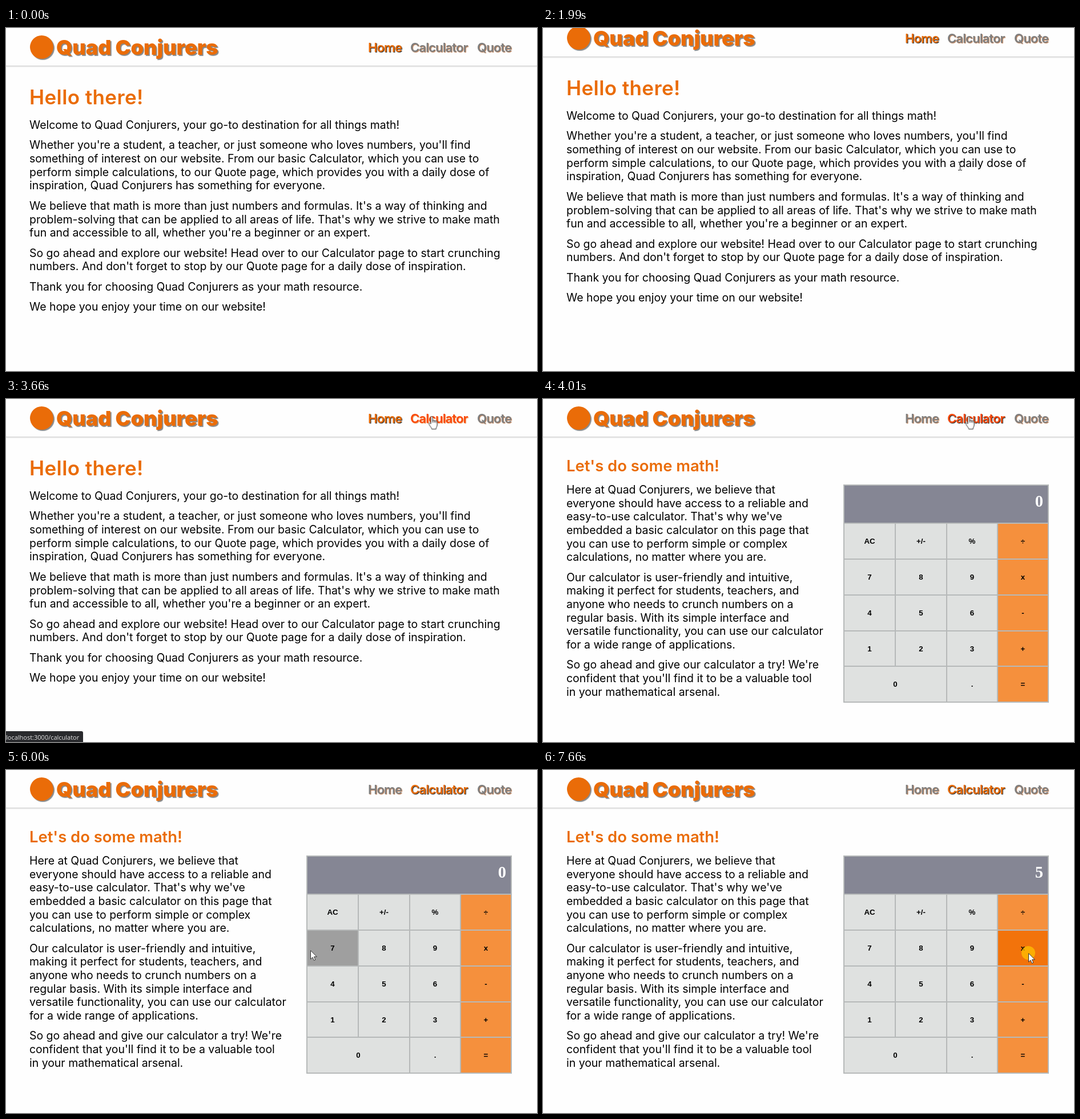
These frames come from a looping animation (930 px wide and 602 px high, 8 s). An HTML page:

```html
<!DOCTYPE html>
<html lang="en">
<head>
<meta charset="utf-8">
<title>Quad Conjurers</title>
<style>
  :root { --orange: #ea6c08; --hot: #fb4a0c; --grey: #808080; --rust: #b8794f; --loop: 8s step-end infinite; }
  html, body { margin: 0; width: 100%; height: 100%; overflow: hidden; background: #fefefe; }
  .stage { position: relative; width: 930px; height: 602px; overflow: hidden; font-family: Inter, "Open Sans", sans-serif; font-optical-sizing: none; font-variation-settings: "opsz" 14; }
  .stage * { box-sizing: border-box; }
  .abs, .layer, nav span, h1, h2, .text, svg { position: absolute; }
  .layer { inset: 0; }
  h1, h2, p { margin: 0; white-space: nowrap; }

  .scroll { animation: scroll var(--loop); }
  header { position: absolute; left: 0; top: 0; width: 930px; height: 67px; border-bottom: 1px solid #d2d2d2; box-shadow: 0 1px 2px #ddd; }
  .logo { left: 42px; top: 13px; width: 41px; height: 41px; border-radius: 50%; background: var(--orange); box-shadow: 2px 2px 1px #8a8a8a; }
  h1 { left: 88px; top: 12px; font-size: 36px; line-height: 44px; font-weight: 900; color: var(--orange); text-shadow: 2px 2px 1px #888; }
  h2 { left: 41px; font-weight: 600; line-height: 44px; color: var(--orange); }
  nav span { top: 20px; line-height: 28px; font-size: 22px; font-weight: 600; letter-spacing: -.85px; color: var(--grey); text-shadow: 1px 1px 1px var(--rust); }
  .text { left: 41px; font-size: 19.45px; line-height: 23.65px; font-weight: 400; color: #000; }
  .text p + p { margin-top: 11.8px; }

  .home { animation: home var(--loop); }
  .calc { visibility: hidden; animation: calc var(--loop); }
  .to-home { animation: to-home var(--loop); }
  .to-calc { animation: to-calc var(--loop); }
  .status { left: -1px; top: 583px; width: 136px; height: 20px; padding-left: 1px; border-radius: 0 3px 0 0; background: #292a2d; color: #e6e6e6; font: 11px/21px "Open Sans", sans-serif; white-space: nowrap; visibility: hidden; animation: status var(--loop); }

  .pad { left: 526px; top: 150px; width: 360px; height: 383px; padding: 2px; display: grid; gap: 2px; grid-template: 65px 61px 61px 61px 60px 61px / 88px 88px 87px 87px; background: #b6b9b9; font: bold 13.3px "Liberation Sans", Arial, sans-serif; }
  .pad div { display: grid; place-items: center; background: #dfe1e0; }
  .pad .op { background: #f5903d; }
  .pad .wide { grid-column: span 2; }
  .pad .screen { grid-column: span 4; position: relative; background: #858694; color: #fff; font: bold 28.5px/56px "Liberation Serif", serif; }
  .screen span { position: absolute; right: 8px; top: 0; }
  .zero { animation: zero var(--loop); }
  .five { animation: five var(--loop); }
  .pad .k7 { animation: k7 var(--loop); }
  .pad .k5 { animation: k5 var(--loop); }
  .pad .kx { animation: kx var(--loop); }

  svg { left: 0; top: 0; overflow: visible; visibility: hidden; }
  .arrow { animation: arrow var(--loop); }
  .beam { animation: beam var(--loop); }
  .hand { animation: hand var(--loop); }
  .click { left: -12px; top: -12px; width: 24px; height: 24px; border-radius: 50%; background: #ffc400b8; visibility: hidden; animation: click var(--loop); }

  @keyframes scroll { 24.875% { transform: translateY(-16px) } 29%, 100% { transform: none } }
  @keyframes home { 0% { visibility: visible } 50.125%, 100% { visibility: hidden } }
  @keyframes calc { 0% { visibility: hidden } 50.125%, 100% { visibility: visible } }
  @keyframes status { 0% { visibility: hidden } 41.75% { visibility: visible } 50.125%, 100% { visibility: hidden } }
  @keyframes to-home {
    0% { color: var(--orange); text-shadow: 1px 1px 1px #222 }
    50.125%, 100% { color: var(--grey); text-shadow: 1px 1px 1px var(--rust) }
  }
  @keyframes to-calc {
    0% { color: var(--grey); text-shadow: 1px 1px 1px var(--rust) }
    37.375% { color: var(--hot); text-shadow: 1px 1px 1px #e98a4a }
    50.125% { color: var(--hot); text-shadow: 1px 1px 1px #222 }
    62.625%, 100% { color: var(--orange); text-shadow: 1px 1px 1px #222 }
  }
  @keyframes zero { 0% { opacity: 1 } 87.5%, 100% { opacity: 0 } }
  @keyframes five { 0% { opacity: 0 } 87.5%, 100% { opacity: 1 } }
  @keyframes k7 { 75% { background: #9f9f9f } 79.25%, 100% { background: #dfe1e0 } }
  @keyframes k5 { 79.25% { background: #9f9f9f } 91.625%, 100% { background: #dfe1e0 } }
  @keyframes kx { 0% { background: #f5903d } 91.625%, 100% { background: #f2730b } }
  @keyframes arrow {
    0% { visibility: hidden }
    12.375% { visibility: visible; transform: translate(743px, 216px) }
    16.5% { visibility: hidden }
    62.625% { visibility: visible; transform: translate(599px, 71px) }
    66.75% { visibility: visible; transform: translate(468px, 266px) }
    70.875% { visibility: visible; transform: translate(467px, 314px) }
    75% { visibility: visible; transform: translate(533px, 316px) }
    79.25% { visibility: visible; transform: translate(668px, 378px) }
    91.625%, 100% { visibility: visible; transform: translate(850px, 321px) }
  }
  @keyframes beam { 0% { visibility: hidden } 16.5% { visibility: visible } 37.375%, 100% { visibility: hidden } }
  @keyframes hand {
    0% { visibility: hidden }
    37.375% { visibility: visible; transform: translate(738px, 30px) }
    41.75% { visibility: visible; transform: translate(736px, 29px) }
    45.75% { visibility: visible; transform: translate(739.5px, 29.5px) }
    62.625%, 100% { visibility: hidden }
  }
  @keyframes click {
    0% { visibility: hidden }
    83.25% { visibility: visible; transform: translate(668px, 378px) }
    87.5% { visibility: hidden }
    95.75%, 100% { visibility: visible; transform: translate(850px, 321px) }
  }
</style>
</head>
<body>
<div class="stage">
  <div class="layer scroll">
    <header>
      <div class="abs logo"></div>
      <h1>Quad Conjurers</h1>
      <nav>
        <span class="to-home" style="left:634px">Home</span>
        <span class="to-calc" style="left:708px">Calculator</span>
        <span style="left:825px">Quote</span>
      </nav>
    </header>

    <main class="layer home">
      <h2 style="top:99px;font-size:35px;letter-spacing:.4px">Hello there!</h2>
      <div class="text" style="top:159px">
        <p>Welcome to Quad Conjurers, your go-to destination for all things math!</p>
        <p>Whether you're a student, a teacher, or just someone who loves numbers, you'll find<br>something of interest on our website. From our basic Calculator, which you can use to<br>perform simple calculations, to our Quote page, which provides you with a daily dose of<br>inspiration, Quad Conjurers has something for everyone.</p>
        <p>We believe that math is more than just numbers and formulas. It's a way of thinking and<br>problem-solving that can be applied to all areas of life. That's why we strive to make math<br>fun and accessible to all, whether you're a beginner or an expert.</p>
        <p>So go ahead and explore our website! Head over to our Calculator page to start crunching<br>numbers. And don't forget to stop by our Quote page for a daily dose of inspiration.</p>
        <p>Thank you for choosing Quad Conjurers as your math resource.</p>
        <p>We hope you enjoy your time on our website!</p>
      </div>
    </main>

    <main class="layer calc">
      <h2 style="top:95px;font-size:27.4px">Let's do some math!</h2>
      <div class="text" style="top:148px">
        <p>Here at Quad Conjurers, we believe that<br>everyone should have access to a reliable and<br>easy-to-use calculator. That's why we've<br>embedded a basic calculator on this page that<br>you can use to perform simple or complex<br>calculations, no matter where you are.</p>
        <p>Our calculator is user-friendly and intuitive,<br>making it perfect for students, teachers, and<br>anyone who needs to crunch numbers on a<br>regular basis. With its simple interface and<br>versatile functionality, you can use our calculator<br>for a wide range of applications.</p>
        <p>So go ahead and give our calculator a try! We're<br>confident that you'll find it to be a valuable tool<br>in your mathematical arsenal.</p>
      </div>
      <div class="abs pad">
        <div class="screen"><span class="zero">0</span><span class="five">5</span></div>
        <div>AC</div><div>+/-</div><div>%</div><div class="op">÷</div>
        <div class="k7">7</div><div>8</div><div>9</div><div class="op kx">x</div>
        <div>4</div><div class="k5">5</div><div>6</div><div class="op">-</div>
        <div>1</div><div>2</div><div>3</div><div class="op">+</div>
        <div class="wide">0</div><div>.</div><div class="op">=</div>
      </div>
    </main>
  </div>

  <div class="abs status">localhost:3000/calculator</div>
  <div class="abs click"></div>
  <svg class="arrow" width="13" height="20" fill="#fff" stroke="#333"><path d="M.5 .8V16L4 12.7 6.3 18.2 8.8 17.1 6.5 11.8H11.3Z"/></svg>
  <svg class="beam" width="9" height="16" fill="none" stroke="#222"><path transform="translate(727 235)" d="M0 .5H3L3.5 1 4 .5H7M3.5 1V14M0 14.5H3L3.5 14 4 14.5H7"/></svg>
  <svg class="hand" width="17" height="25" fill="#fff" stroke="#222" stroke-linejoin="round"><path d="M4.6 14V2.3a1.6 1.6 0 0 1 3.2 0V9a1.4 1.4 0 0 1 2.8.2 1.4 1.4 0 0 1 2.7.5 1.2 1.2 0 0 1 2.4.6V16c0 3-2 4-2 7.3H6.2c0-2-2.7-4.5-5.2-8.8-.6-1.6 1-2.6 2.2-1.4ZM7.8 9V12M10.6 9.2V12M13.3 9.8V12.4"/></svg>
</div>
</body>
</html>
```
